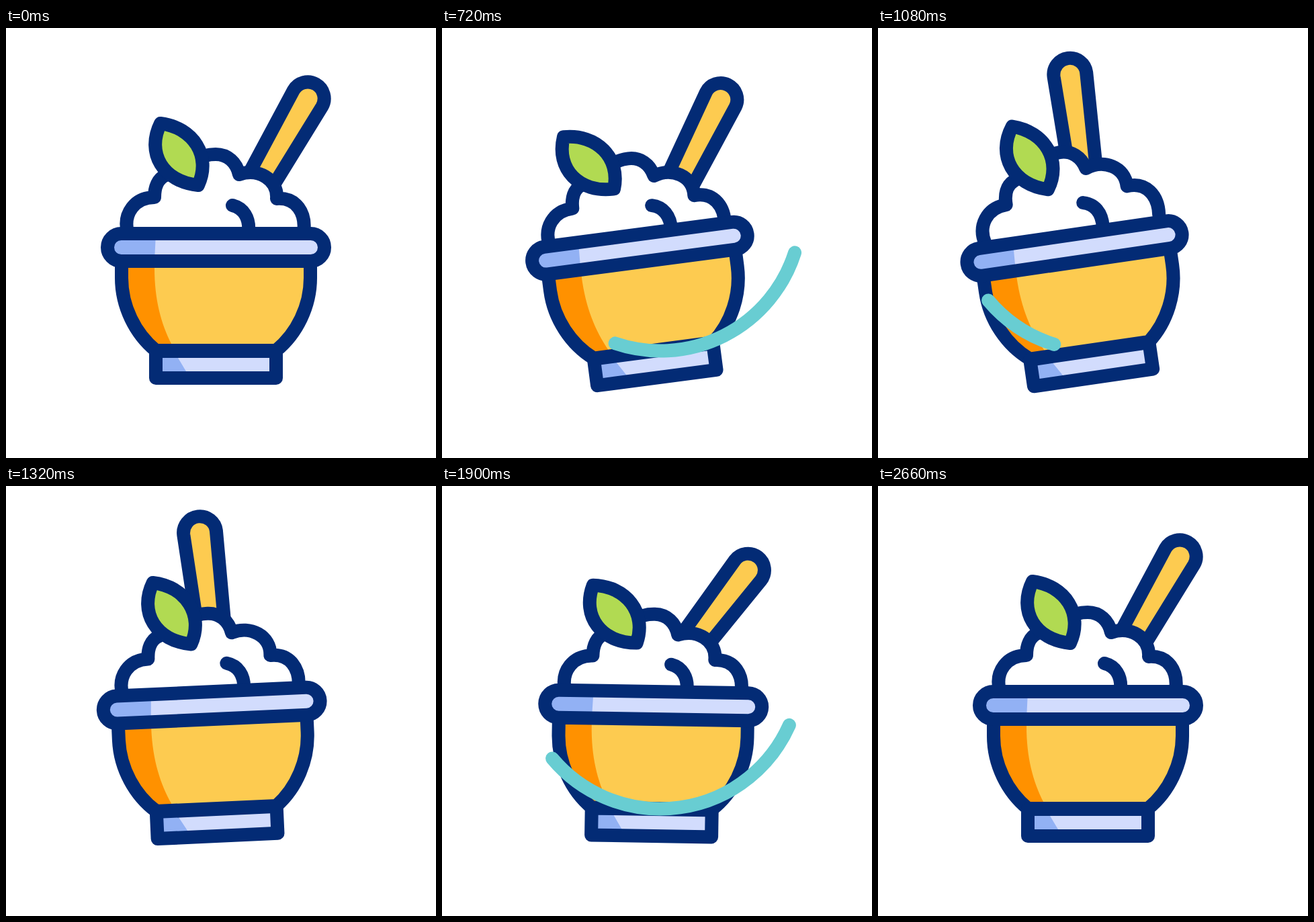
An HTML page that plays this animation: 640 px wide and 640 px high, repeating every 2800 ms.

```html
<!DOCTYPE html>
<html lang="en">
<head>
<meta charset="utf-8">
<title>Stirred rice bowl</title>
<style>
  html, body { margin: 0; height: 100%; overflow: hidden; background: #fff; }
  svg { display: block; width: 100vw; height: 100vh; }
  .line { stroke: #032b75; stroke-width: 20; stroke-linecap: round; stroke-linejoin: round; }
</style>
</head>
<body>
<svg viewBox="0 0 640 640">
  <g id="spoon">
    <path class="line" fill="#fdcb50" d="M-18.500 200L-24.500 2A24.500 24.500 0 0 1 24.500 2L18.500 200Z"/>
  </g>
  <g id="bowl">
    <path id="rice" class="line" fill="#fff" d="M181 304C174 276 192 252 221 252C221 237 226 224 238 219L285 196C292 190 302 188 312 188C330 188 343 200 347 218C375 208 405 225 403 254C432 252 447 275 443 304"/>
    <path id="swirl" class="line" fill="none" d="M337 264C353 268 363 282 361 304"/>
    <path id="leaf" class="line" fill="#b1da52" d="M230 142C208 186 234 229 286 234C306 191 279 148 230 142Z"/>
    <path fill="#fdcb50" d="M172 346V372C172 414 192 455 223 480H402C433 455 453 414 453 372V346Z"/>
    <path fill="#ff9100" d="M172 346H221V357C221 405 231 440 246 470V480H223C192 455 172 414 172 372Z"/>
    <path class="line" fill="none" d="M172 346V372C172 414 192 455 223 480H402C433 455 453 414 453 372V346Z"/>
    <path fill="#d2dcfd" d="M223 481H402V521H223Z"/>
    <path fill="#92b1f4" d="M223 481H251L256 491L268 511L274 521H223Z"/>
    <path class="line" fill="none" d="M223 481H402V521H223Z"/>
    <rect x="151" y="306" width="323" height="41" rx="20.500" fill="#d2dcfd"/>
    <path fill="#92b1f4" d="M171.500 306H223L221 347H171.500A20.500 20.500 0 0 1 171.500 306Z"/>
    <rect class="line" x="151" y="306" width="323" height="41" rx="20.500" fill="none"/>
  </g>
  <path id="swoosh" fill="none" stroke="#68cdd2" stroke-width="20" stroke-linecap="round"/>
</svg>
<script>
const LOOP = 2800, START = 220, END = 2660;
const LEFT = -50, RIGHT = 72.3; // swoosh limits, degrees from straight down
const byId = id => document.getElementById(id);
const place = (id, transform) => byId(id).setAttribute('transform', transform);

// Eased 0 to 1 between two times.
function ease(t, from, to) {
  const u = Math.min(1, Math.max(0, (t - from) / (to - from)));
  return u * u * (3 - 2 * u);
}

// Swings from one turning point [time, value] to the next.
const swing = (t, ...turns) => turns.reduce((value, [time, next], i) =>
  i ? value + (next - turns[i - 1][1]) * ease(t, turns[i - 1][0], time) : next, 0);

function drawBowl(t) {
  const tilt = swing(t, [START, 0], [390, 3.7], [845, -10], [905, -10], [1730, 4.6], [1970, 0]);
  const drop = swing(t, [START, 0], [450, 12], [1090, -7], [1580, 12], [2060, 0]);
  const turn = swing(t, [START, 0], [560, -10], [1080, 10], [1640, -10], [2320, 0]);
  place('bowl', `rotate(${tilt} 312.5 465)`);
  place('rice', `translate(0 ${drop * 0.87}) rotate(${drop * 0.16} 312 250)`);
  place('swirl', `translate(${drop * 0.3} ${drop * 0.4})`);
  place('leaf', `rotate(${turn} 286 234)`);
}

// The tip follows a shallow parabola over the lean angle, easing out of and into its rest place.
function drawSpoon(t) {
  const lean = swing(t, [START, 29.9], [520, 37], [1190, -11], [1920, 37.5], [2480, 0], [END, 29.9]);
  const rest = 1 - ease(t, START, 540) + ease(t, 2480, END);
  const hop = 24 * ease(t, 2380, 2500) * (1 - ease(t, 2500, END));
  const x = 314.5 + 3.8 * lean + 22 * rest;
  const y = 72.7 + 0.82 * lean + 0.0145 * lean ** 2 - 7 * rest - hop;
  place('spoon', `translate(${x} ${y}) rotate(${lean})`);
}

function drawSwoosh(t) {
  const left = swing(t, [460, RIGHT], [850, LEFT]);
  const right = swing(t, [800, RIGHT], [1225, LEFT], [1392, LEFT], [1982, RIGHT], [2572, LEFT]);
  const point = degrees => {
    const a = degrees * Math.PI / 180;
    return `${325 + 210 * Math.sin(a)} ${270.5 + 210 * Math.cos(a)}`;
  };
  byId('swoosh').setAttribute('d',
    right - left < 0.1 ? '' : `M${point(left)}A210 210 0 0 0 ${point(right)}`);
}

function draw() {
  const t = performance.now() % LOOP;
  drawBowl(t);
  drawSpoon(t);
  drawSwoosh(t);
  requestAnimationFrame(draw);
}
draw();
</script>
</body>
</html>
```
